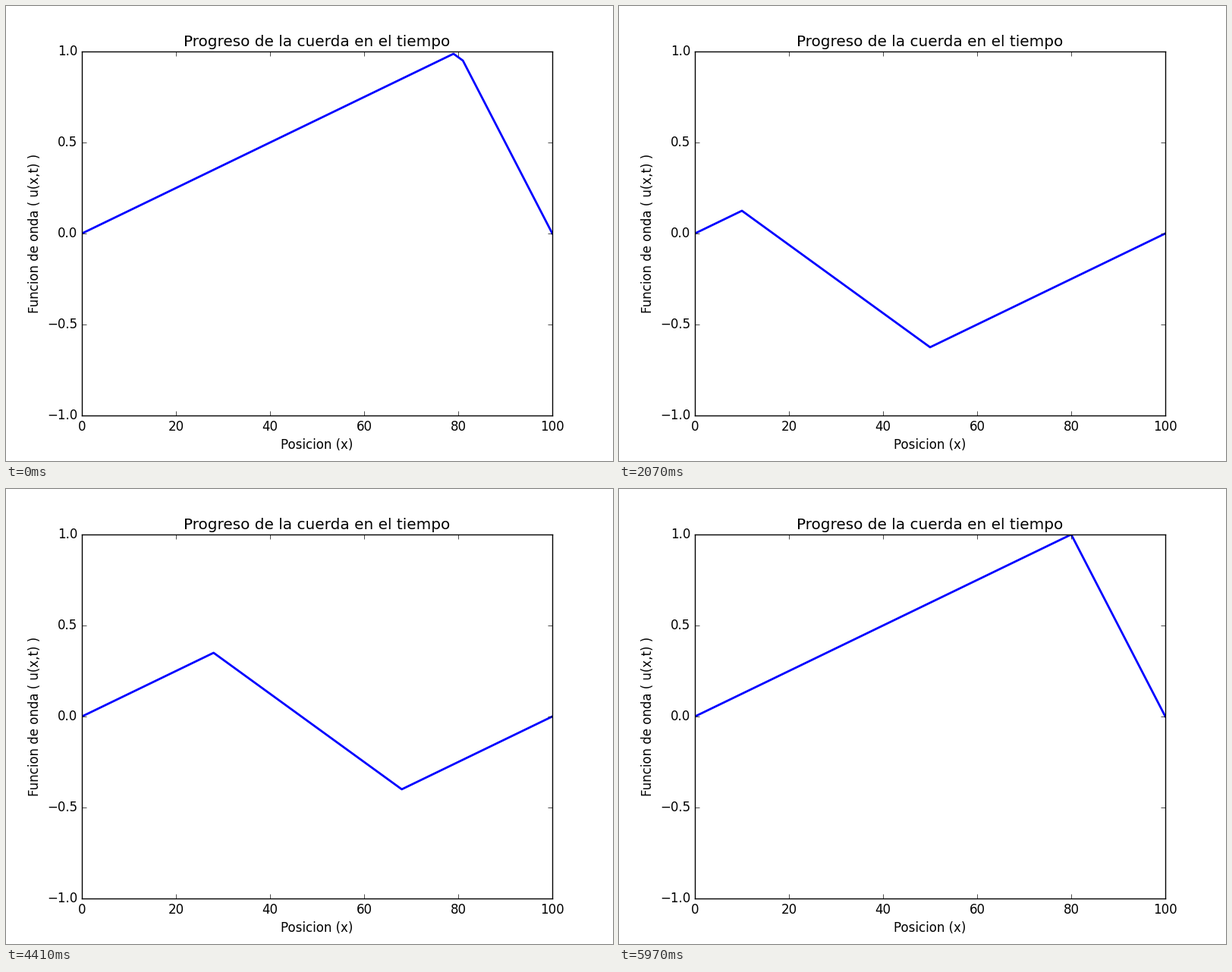
These frames come from a looping animation (800 by 600 pixels, 6 s). A matplotlib script:

```python
import numpy as np
import matplotlib.pyplot as plt
from matplotlib.animation import FuncAnimation

plt.style.use("classic")
plt.rcParams.update({
    "font.family": "DejaVu Sans",
    "figure.facecolor": "white",
    "savefig.facecolor": "white",
    "figure.dpi": 100,
    "savefig.dpi": 100,
})

LENGTH = 100   # string length, fixed at both ends
PLUCK = 80     # where the string is pulled up to height 1
FRAMES = 200   # one full period at unit wave speed
INTERVAL = 30

x = np.arange(LENGTH + 1)


def pluck(s):
    """Initial triangle, extended as an odd function of period 2 * LENGTH."""
    s = (s + LENGTH) % (2 * LENGTH) - LENGTH
    a = np.abs(s)
    return np.sign(s) * np.minimum(a / PLUCK, (LENGTH - a) / (LENGTH - PLUCK))


def wave(t):
    """d'Alembert solution: two half-height waves travelling apart."""
    return (pluck(x - t) + pluck(x + t)) / 2


fig, ax = plt.subplots(figsize=(8, 6), dpi=100)
ax.set_xlim(0, LENGTH)
ax.set_ylim(-1, 1)
ax.set_xticks(range(0, LENGTH + 1, 20))
ax.set_yticks(np.linspace(-1, 1, 5))
ax.set_title("Progreso de la cuerda en el tiempo")
ax.set_xlabel("Posicion (x)")
ax.set_ylabel("Funcion de onda ( u(x,t) )")
line, = ax.plot(x, wave(1), color="blue", lw=2)


def update(i):
    line.set_ydata(wave(i + 1))
    return line,


anim = FuncAnimation(fig, update, frames=FRAMES, interval=INTERVAL,
                     repeat=True, repeat_delay=0, blit=False)
plt.show()
```
